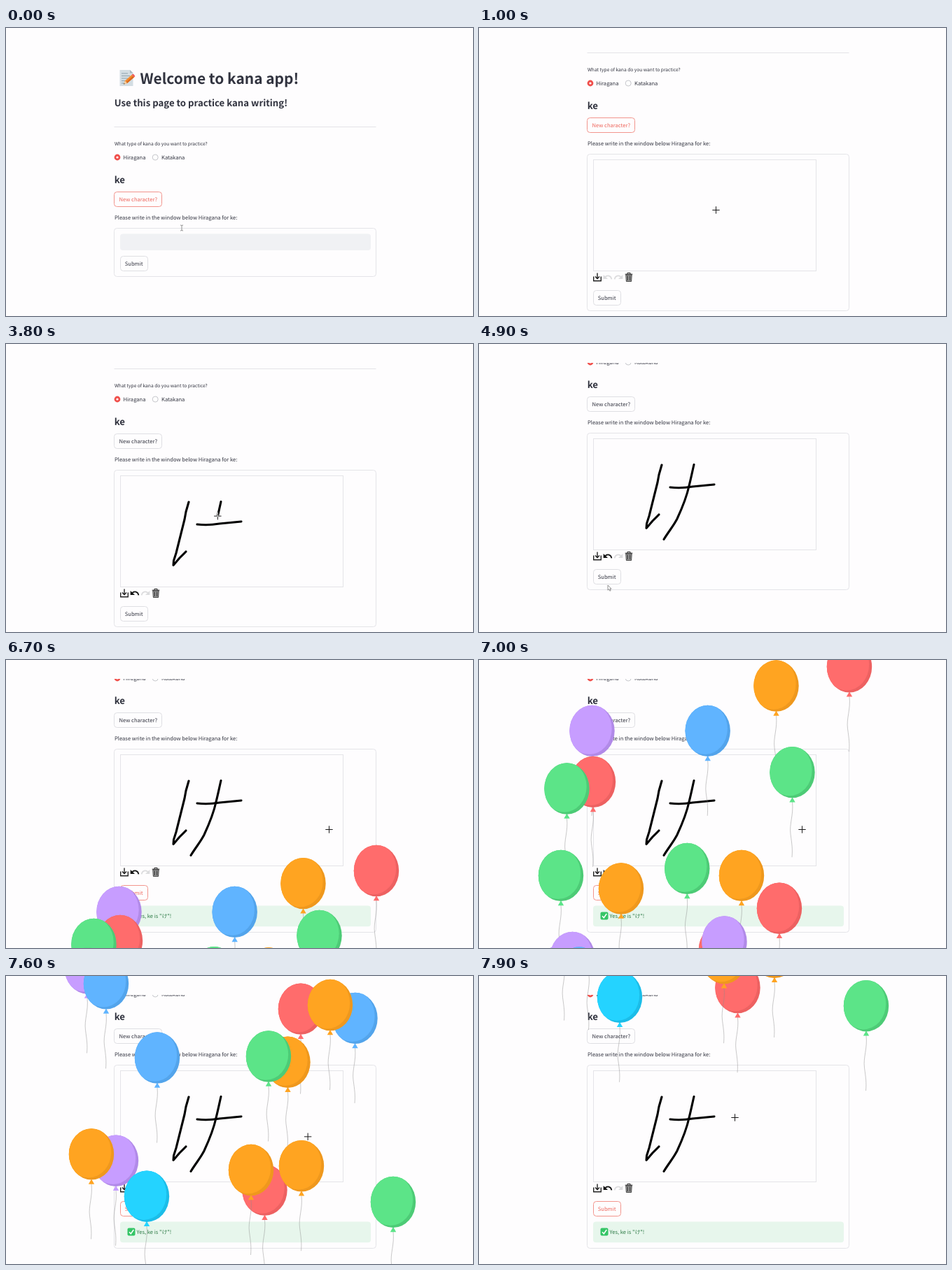
Recreate the animation shown at these times as an HTML page. Size 667 by 412 pixels, loop 8 s.

```html
<!DOCTYPE html>
<html lang="en">
<head>
<meta charset="utf-8">
<title>Kana practice</title>
<style>
  html, body { margin: 0; width: 100%; height: 100%; overflow: hidden; background: #fefdfe; }
  svg { display: block; width: 667px; height: 412px; }
  text {
    font: 7.6px "Noto Sans CJK JP", "Noto Sans CJK SC", "Noto Sans", sans-serif;
    fill: #31333f; text-rendering: geometricPrecision; white-space: pre;
  }
  text.title { font-size: 20.9px; font-weight: 700; }
  text.sub { font-size: 13.2px; font-weight: 600; }
  text.label { font-size: 6.66px; }
  text.mid { text-anchor: middle; }
  .box { fill: none; stroke: #e4e4e8; }
  .button rect { fill: #fefdfe; stroke: #dfdfe3; }
  .button.active rect { stroke: #f2958d; }
  .button.active text { fill: #ee645a; }
  .ink { fill: none; stroke: #000; stroke-width: 3.1; stroke-linecap: round; stroke-linejoin: round; }
  .line { fill: none; stroke: #222; }
  #cursor.cross { mix-blend-mode: difference; }
  #cross { fill: none; stroke: #e4e4e4; }
</style>
</head>
<body>
<svg viewBox="0 0 667 412">
  <defs>
    <clipPath id="view"><rect y="27" width="667" height="385"/></clipPath>
    <clipPath id="body"><ellipse cy="36.5" rx="32.2" ry="36.7"/></clipPath>
    <g id="arrowIcon">
      <path d="M-4 0C-1-3.4 4.4-2.6 5.4 2.8" fill="none" stroke="currentColor" stroke-width="1.8"/>
      <path d="M-6.3-3.6V2.6H0Z" fill="currentColor"/>
    </g>
  </defs>
  <rect width="667" height="412" fill="#fefdfe"/>

  <g clip-path="url(#view)"><g id="page">
    <g id="memo">
      <path d="M162.5 60H177L181.5 64.5V83H162.5Z" fill="#d3dde3"/>
      <path d="M177 60V64.5H181.5Z" fill="#a9b9c2"/>
      <path d="M165 65h9M165 68.5h12M165 72h9M165 75.5h6M165 79h4" stroke="#8fa3ae"/>
      <path d="M168 80.5L170 75.5L179.5 67L183 70.5L173 79Z" fill="#f58a2c"/>
      <path d="M171.5 77.5L181.2 68.8L183 70.5L173 79Z" fill="#d96a20"/>
      <path d="M179.5 67L181 65.7Q183 65.5 184.3 69.3L183 70.5Z" fill="#ef5a5a"/>
      <path d="M168 80.5L170 75.5L173 79Z" fill="#f3cf9f"/>
      <path d="M168 80.5L168.7 78.7L169.8 79.9Z" fill="#444"/>
    </g>
    <text class="title" x="191.5" y="79.5">Welcome to kana app!</text>
    <text class="sub" x="154.7" y="112">Use this page to practice kana writing!</text>
    <path class="box" d="M154.500 141.500H528.500"/>
    <text class="label" x="155" y="168">What type of kana do you want to practice?</text>
    <circle cx="159" cy="185" r="4.4" fill="#f04f4b"/>
    <circle cx="159" cy="185" r="1.6" fill="#fff"/>
    <circle cx="213.2" cy="185" r="4" fill="#fff" stroke="#bfc0c6" stroke-width=".9"/>
    <text x="167.5" y="188">Hiragana</text>
    <text x="222" y="188">Katakana</text>
    <text class="sub" x="154.7" y="221.7">ke</text>
    <g class="button" id="newButton">
      <rect x="154.5" y="234.5" width="68" height="21" rx="4"/>
      <text class="mid" x="188.8" y="247.7">New character?</text>
    </g>
    <text x="155" y="273.7">Please write in the window below Hiragana for ke:</text>

    <rect class="box" id="form" x="154.5" y="286.5" width="374" rx="4"/>
    <rect id="skeleton" x="163" y="294.5" width="358" height="23.5" rx="4" fill="#f0f1f4"/>
    <g id="pad">
      <rect class="box" x="163.5" y="294.5" width="318" height="159"/>
      <path class="ink" d="M261 332Q259 339 257 346L255 357L250 377L243 405L239.5 416L239 422.5L248 412L257 403"/>
      <path class="ink" d="M273 364Q288 366 305 363L336 360"/>
      <path class="ink" d="M307 331.5C305 340 303 350 300 362C297 376 289 396 283 409C278 419 271 427 264 438.5"/>
      <path class="line" transform="translate(169 462.5)" stroke-width="1.4" d="M-5.3-1V5.2H5.3V-1M0-6V2M-3-1L0 2.2L3-1"/>
      <use id="undo" href="#arrowIcon" transform="translate(184 462.5)"/>
      <use href="#arrowIcon" transform="translate(199 462.5) scale(-1 1)" color="#dcdcde"/>
      <g transform="translate(214 462.5)">
        <path d="M-4.2-3.5H4.2L3.6 6H-3.6Z" fill="#9a9a9a" stroke="#333" stroke-width=".9"/>
        <path class="line" d="M-5.3-4.3H5.3M-2-4.5V-6.2H2V-4.5M-1.6-2V4.5M1.6-2V4.5"/>
      </g>
    </g>
    <g class="button" id="submit">
      <rect x="163.5" y="326.5" width="39" height="21" rx="4"/>
      <text class="mid" x="182.7" y="339.8">Submit</text>
    </g>
    <g id="success">
      <rect x="163" y="510.5" width="358" height="29.7" rx="4" fill="#e7f6ec"/>
      <rect x="173.5" y="519.5" width="11" height="11" rx="2" fill="#35c566"/>
      <path d="M176 525.2L178.3 527.7L182.3 522" fill="none" stroke="#fff" stroke-width="1.5"/>
      <text x="186.5" y="528.3" style="fill:#2c7a45">Yes, ke is "け"!</text>
    </g>
  </g></g>

  <g id="balloons"></g>

  <g id="cursor">
    <path id="beam" fill="none" stroke="#777" stroke-width=".8" d="M-2-4Q0-4 0-3Q0-4 2-4M0-3V3M-2 4Q0 4 0 3Q0 4 2 4"/>
    <path id="cross" d="M-5.2 0H5.2M0-5.2V5.2"/>
    <path id="arrow" d="M0-4V3.2L1.7 1.7L2.9 4.3L4.1 3.7L3 1.2H5Z" fill="#fff" stroke="#666" stroke-width=".7"/>
  </g>
</svg>
<script>
const LOOP = 8000, TICK = 100;
const SKELETON_END = 300, SUCCESS_AT = 6300;
const VIEW_HEIGHT = 412, BALLOON_HEIGHT = 159, RISE_MS = 734;

const $ = id => document.getElementById(id);
const clamp = v => Math.min(1, Math.max(0, v));
const smooth = v => v * v * (3 - 2 * v);
const span = (t, from, to) => clamp((t - from) / (to - from));
const show = (el, on) => el.setAttribute('visibility', on ? 'inherit' : 'hidden');
const move = (el, x, y) => el.setAttribute('transform', `translate(${x} ${y})`);

const COLORS = {
  red: ['#ff6c6c', '#ed6161'], orange: ['#ffa421', '#ef981d'],
  green: ['#5ce488', '#4dcb76'], blue: ['#60b4ff', '#53a4eb'],
  purple: ['#c79dff', '#b18ae8'], cyan: ['#24d3ff', '#1bbde8'],
};

// colour, x, launch time; later entries lie in front
const balloons = [
  ['red', 529, 6374], ['orange', 424.5, 6398], ['blue', 326.7, 6457],
  ['purple', 161.5, 6457], ['red', 163, 6529], ['green', 125.5, 6539],
  ['green', 447.5, 6515], ['green', 117, 6683], ['orange', 203, 6708],
  ['green', 297.3, 6670], ['orange', 375, 6683], ['red', 429, 6749],
  ['red', 346, 6857], ['purple', 350.5, 6832],
  ['purple', 116, 6956], ['purple', 133.5, 6884], ['blue', 143, 6975],
  ['blue', 216, 7072], ['red', 421, 7007], ['blue', 498.5, 7019],
  ['orange', 463, 7002], ['orange', 402.5, 7078], ['green', 375, 7070],
  ['purple', 157, 7228], ['orange', 122, 7217], ['cyan', 201, 7292],
  ['red', 369.5, 7280], ['orange', 350, 7244], ['orange', 422, 7237],
  ['green', 553, 7303],
].map(([color, x, start]) => {
  const [light, dark] = COLORS[color];
  const el = document.createElementNS('http://www.w3.org/2000/svg', 'g');
  el.innerHTML = `
    <path d="M0 79C2 98-4.5 110-2.5 125S.5 146-.5 158" fill="none" stroke="#888" stroke-opacity=".65" stroke-width=".7"/>
    <path d="M0 72L-4.2 79.3H4.2Z" fill="${light}"/>
    <g clip-path="url(#body)">
      <rect x="-33" y="-1" width="66" height="75" fill="${dark}"/>
      <ellipse cx="-4" cy="33.5" rx="32.2" ry="36.7" fill="${light}"/>
    </g>`;
  $('balloons').append(el);
  return { el, x, start };
});

// cubic-bezier(.42, 0, 1, 1), solved by bisection
function easeIn(x) {
  let lo = 0, hi = 1;
  for (let i = 0; i < 24; i++) {
    const s = (lo + hi) / 2;
    if (smooth(s) + 1.26 * s * (1 - s) ** 2 < x) lo = s; else hi = s;
  }
  return smooth(lo);
}

const strokeTimes = [[1800, 2330], [2750, 3250], [3700, 4250]];
const strokes = [...document.querySelectorAll('.ink')].map((el, i) =>
  ({ el, length: el.getTotalLength(), from: strokeTimes[i][0], to: strokeTimes[i][1] }));

// time, x, y on the stage
const cursorKeys = [
  [0, 251, 286], [400, 251, 286], [900, 342, 262], [1700, 261, 226],
  [2330, 257, 297], [2650, 273, 258], [3250, 336, 254], [3550, 307, 225.5],
  [4250, 264, 332.5], [4850, 184, 349], [5100, 184, 349], [5300, 183, 338],
  [5550, 183, 338], [6000, 461.5, 242.5], [7450, 461.5, 242.5],
  [7850, 365.5, 202.5], [LOOP, 365.5, 202.5],
];

const scrollAt = t => 106 * smooth(span(t, 450, 900)) + 53 * smooth(span(t, 4400, 4800));

function cursorAt(t, scroll) {
  const active = strokes.find(s => t >= s.from && t <= s.to);
  if (active) {
    const p = active.el.getPointAtLength(active.length * span(t, active.from, active.to));
    return [p.x, p.y - scroll];
  }
  const i = cursorKeys.findIndex(k => k[0] > t);
  const [t0, x0, y0] = cursorKeys[i - 1], [t1, x1, y1] = cursorKeys[i];
  const k = smooth(span(t, t0, t1));
  return [x0 + (x1 - x0) * k, y0 + (y1 - y0) * k];
}

function drawPage(t, scroll) {
  const ready = t >= SKELETON_END, success = t >= SUCCESS_AT;
  move($('page'), 0, -scroll);
  show($('skeleton'), !ready);
  show($('pad'), ready);
  show($('success'), success);
  $('form').setAttribute('height', success ? 262 : ready ? 224 : 69);
  move($('submit'), 0, ready ? 155 : 0);
  $('submit').classList.toggle('active', t >= 5300);
  $('newButton').classList.toggle('active', t < 1800);
  $('undo').setAttribute('color', t >= 2400 ? '#111' : '#dcdcde');
  for (const s of strokes) {
    const drawn = s.length * span(t, s.from, s.to);
    show(s.el, ready && t >= s.from);
    s.el.setAttribute('stroke-dasharray', `${drawn} ${s.length + 10}`);
  }
}

function drawBalloons(t) {
  for (const b of balloons) {
    const x = (t - b.start) / RISE_MS;
    const flying = x > 0 && x < 1;
    show(b.el, flying);
    if (flying) move(b.el, b.x, VIEW_HEIGHT - (VIEW_HEIGHT + BALLOON_HEIGHT) * easeIn(x));
  }
}

function drawCursor(t, scroll) {
  const [x, y] = cursorAt(t, scroll);
  const onPad = x > 163 && x < 482 && y > 294.5 - scroll && y < 453.5 - scroll;
  const kind = t < 450 ? 'beam' : onPad ? 'cross' : 'arrow';
  move($('cursor'), x, y);
  $('cursor').setAttribute('class', kind);
  for (const id of ['beam', 'cross', 'arrow']) show($(id), id === kind);
}

function render(t) {
  const scroll = scrollAt(t);
  drawPage(t, scroll);
  drawBalloons(t);
  drawCursor(t, scroll);
}

const begin = performance.now();
function frame() {
  const t = (performance.now() - begin) % LOOP;
  render(Math.floor(t / TICK) * TICK);
  requestAnimationFrame(frame);
}
frame();
</script>
</body>
</html>
```
